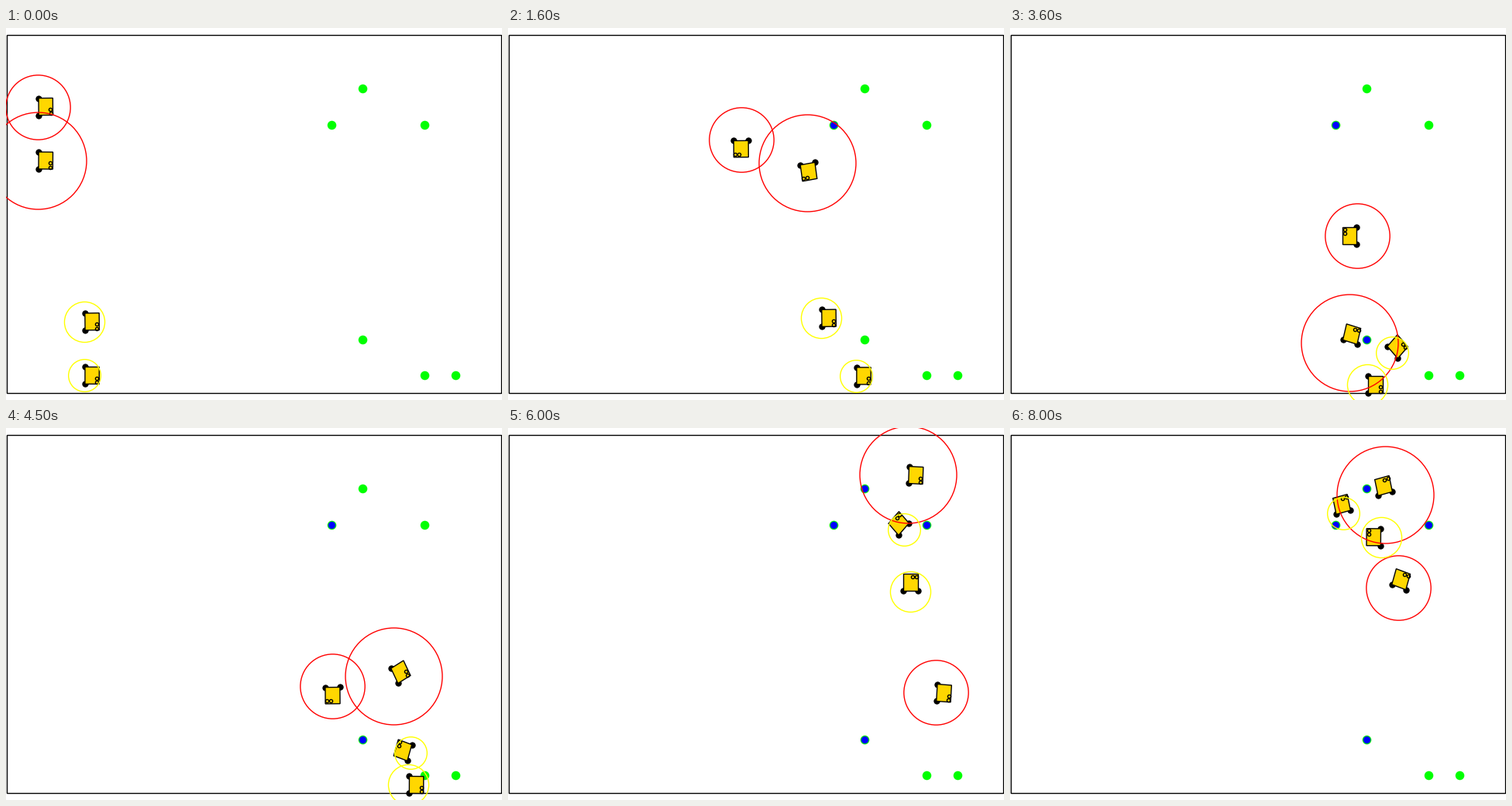
A matplotlib script that plays this animation: 640x480 px, repeating every 8.1 s.

```python
import numpy as np
import matplotlib.pyplot as plt
from matplotlib.animation import FuncAnimation
from matplotlib.patches import Polygon, Rectangle

W, H, DPI = 640, 480, 100
FRAMES, INTERVAL = 81, 100
ORIGIN = np.array([1.2, 471.5])
UNIT = np.array([19.95, -23.12])  # pixels per field unit, y points up
SPEED = 1.09                      # field units per frame
TURN = 45                         # degrees per frame
GREEN, BLUE, GOLD = "#00ff00", "#0000ff", "#ffd700"

fig = plt.figure(figsize=(W / DPI, H / DPI), dpi=DPI, facecolor="white")
ax = fig.add_axes([0, 0, 1, 1])
ax.set(xlim=(0, W), ylim=(H, 0))
ax.axis("off")


def field(x, y):
    return ORIGIN + np.array([x, y]) * UNIT


def dots(points, size, color, zorder, filled=True):
    """Round markers; hollow ones get a thin outline instead of a fill."""
    x, y = np.transpose(points)
    return ax.plot(x, y, "o", ms=size, mfc=color if filled else "none", mec=color,
                   mew=0 if filled else 1, zorder=zorder)[0]


def drive(start, legs):
    """Pose per frame: turn on the spot, then run straight at constant speed.

    Each leg is (departure frame, x, y); the turn ends at the departure.
    """
    pos, heading = start, 0
    moves, turns = [(0, *pos)], [(0, heading)]
    for depart, x, y in legs:
        stop = np.array([x, y]) + 0.4
        dx, dy = (stop - pos) / UNIT
        aim = np.degrees(np.arctan2(dy, dx))
        swing = (aim - heading + 180) % 360 - 180
        turns += [(depart - abs(swing) / TURN, heading), (depart, heading + swing)]
        moves += [(depart, *pos), (depart + np.hypot(dx, dy) / SPEED, *stop)]
        pos, heading = stop, heading + swing
    steps = np.arange(FRAMES)
    move_t, xs, ys = np.transpose(moves)
    turn_t, angles = np.transpose(turns)
    return np.column_stack([np.interp(steps, move_t, xs), np.interp(steps, move_t, ys),
                            np.interp(steps, turn_t, angles)])


class Robot:
    body = [(0.05, 0.475), (0.97, 0.475), (0.97, -0.475), (0.05, -0.475)]
    wheels = [(0.05, 0.475), (0.05, -0.475)]
    eyes = [(0.82, -0.145), (0.82, -0.38)]

    def __init__(self, color, size, start, legs):
        self.reach = size / 2 * DPI / 72
        self.poses = drive(field(*start), legs)
        self.wheel_dots = dots(self.wheels, 6, "black", 2)
        self.box = ax.add_patch(Polygon(self.body, fc=GOLD, ec="black", lw=1, zorder=3))
        self.eye_rings = dots(self.eyes, 3, "black", 4, filled=False)
        self.ring = dots([(0, 0)], size, color, 5, filled=False)

    def pose(self, i):
        *center, heading = self.poses[i]
        c, s = np.cos(np.radians(heading)), np.sin(np.radians(heading))

        def place(points):
            return center + np.array(points) @ [[c, s], [-s, c]] * UNIT

        self.box.set_xy(place(self.body))
        self.wheel_dots.set_data(*place(self.wheels).T)
        self.eye_rings.set_data(*place(self.eyes).T)
        self.ring.set_data([center[0]], [center[1]])

    def first_sight(self, spot):
        near = np.hypot(*(self.poses[:, :2] - spot).T) < self.reach
        return near.argmax() if near.any() else FRAMES


scout = Robot("red", 60, (2, 16), [
    (0, 300, 98.5), (14.2, 301, 257), (22, 361, 256.5), (27, 448, 268),
    (36, 420.5, 268), (40, 421, 333), (52, 447.5, 333), (54, 552, 341),
    (64.5, 552, 220), (74, 501, 220), (78.5, 501, 206), (81.6, 552, 206)])
ranger = Robot("red", 90, (2, 13), [
    (0, 386, 173.5), (16.2, 386, 405.5), (27.4, 438, 406), (36.3, 440, 322),
    (42, 500, 320), (46.4, 494, 59), (59, 554.5, 62), (63.2, 554.5, 73.5),
    (68, 554.5, 72), (71.5, 484, 85.5), (80.3, 484, 59)])
hauler = Robot("yellow", 37.5, (5, 4), [
    (0, 403.5, 374), (22, 405, 459.5), (27.5, 461, 459.5), (37, 519, 460),
    (50.1, 519, 170), (63.6, 539.5, 168.5), (69, 539.5, 141), (74, 479, 140.5)])
runner = Robot("yellow", 30, (5, 1), [
    (0, 455, 448.5), (18, 456, 427), (22.4, 456, 428.5), (24.5, 480, 428.5),
    (27, 492.5, 428.5), (30, 492.5, 419), (37, 543, 419), (44, 511, 419),
    (46.6, 511, 131), (61, 490, 131), (66.5, 496, 131), (69.1, 496, 109.5),
    (74, 430, 109.5), (80.3, 430, 80)])
robots = [scout, ranger, hauler, runner]

ax.add_patch(Rectangle((1, 9.1), 638.2, 462.3, fill=False, ec="black", lw=1, zorder=0))

marks = []
for cell in [(21, 15), (23, 17), (27, 15), (23, 3), (27, 1), (29, 1)]:
    spot = field(*cell)
    dots([spot], 8.3, GREEN, 1)
    found_at = min(r.first_sight(spot) for r in (scout, ranger))
    marks.append((dots([spot], 6.7, BLUE, 1.5), found_at))


def update(i):
    for robot in robots:
        robot.pose(i)
    for mark, found_at in marks:
        mark.set_visible(i >= found_at)
    return []


anim = FuncAnimation(fig, update, frames=FRAMES, interval=INTERVAL,
                     repeat=True, repeat_delay=0, blit=False)
plt.show()
```
